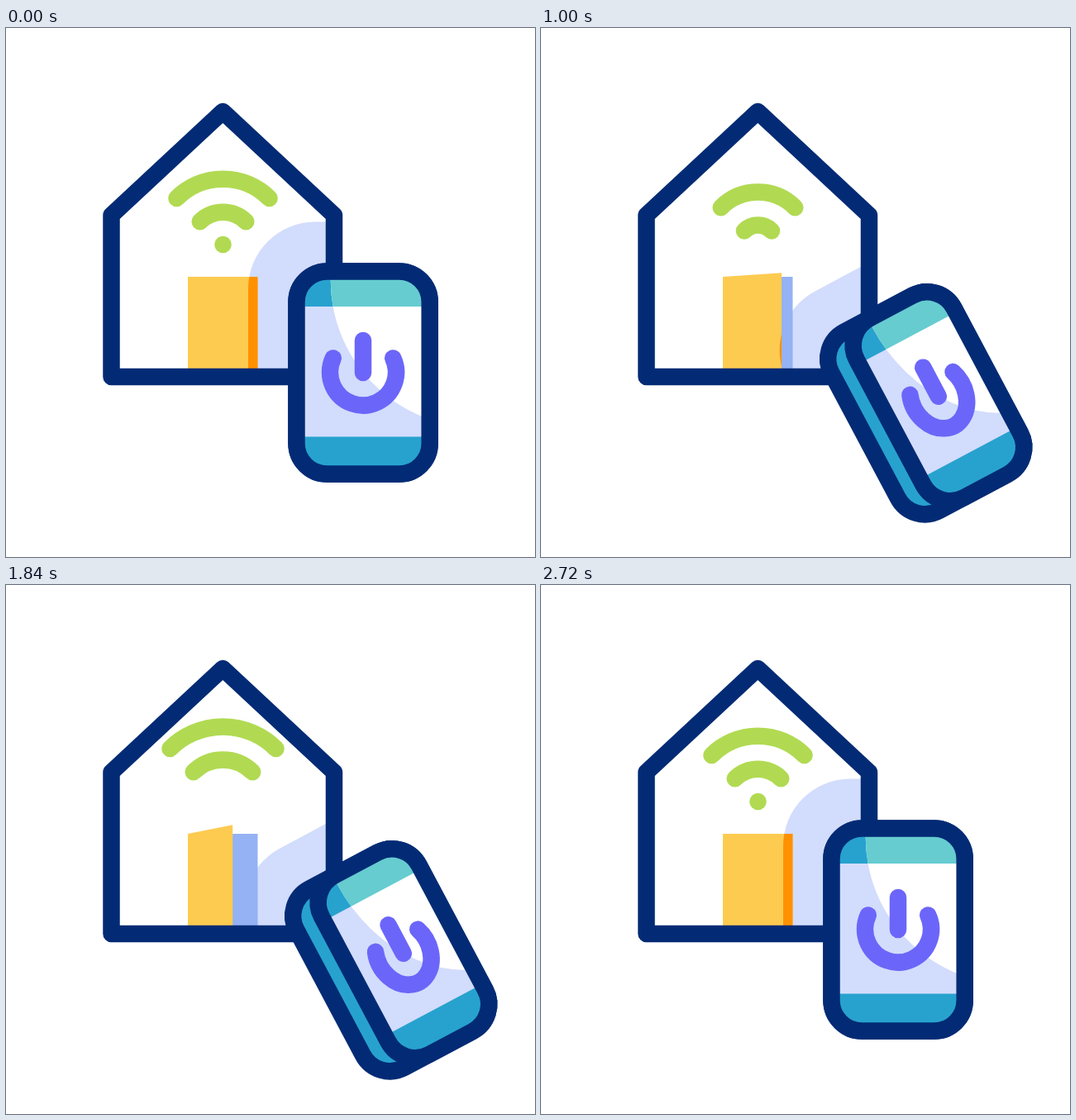
Recreate the animation shown at these times as an HTML page with a canvas. Size 640x640 px, loop 3000 ms.

```html
<!DOCTYPE html>
<html lang="en">
<head>
<meta charset="utf-8">
<title>Smart home</title>
<style>
  html, body { margin: 0; width: 100%; height: 100%; overflow: hidden; background: #fff; }
  canvas { display: block; width: 640px; height: 640px; }
</style>
</head>
<body>
<canvas id="stage" width="640" height="640"></canvas>
<script>
const ctx = document.getElementById('stage').getContext('2d');
const LOOP = 3000, LINE = 20.5;
const NAVY = '#032b75', GREEN = '#b1da52', YELLOW = '#fdcb50', ORANGE = '#ff9100',
      LILAC = '#d2dcfc', BLUE = '#94b2f4', TEAL = '#27a2ce', AQUA = '#66ccd0', PURPLE = '#6b66f9';
const PIVOT = { x: 521, y: 361.5 };
const RIGHT = 502.5; // right edge of the screen, fixed while the phone turns

// Keys are [time, value] pairs joined by a smooth ease.
function ease(t, keys) {
  let [t0, v0] = keys[0];
  for (const [t1, v1] of keys) {
    if (t < t1) {
      const p = Math.max(0, (t - t0) / (t1 - t0));
      return v0 + (v1 - v0) * p * p * (3 - 2 * p);
    }
    [t0, v0] = [t1, v1];
  }
  return v0;
}

const tilt = t => ease(t, [[400, 0], [900, 28], [1900, 28], [2400, 0]]);
const turn = t => ease(t, [[200, 0], [800, 1], [2000, 1], [2600, 0]]);
const doorSwing = t => ease(t, [[800, 0], [1380, 48.5], [1600, 48.5], [2060, 14.5], [2300, 14.5], [2600, 0]]);
const iconScale = t => ease(t, [[960, 1], [1280, 1.4], [1560, 0.935], [1800, 1]]);

function polygon(...points) {
  const path = new Path2D();
  points.forEach(([x, y]) => path.lineTo(x, y));
  path.closePath();
  return path;
}

function rounded(left, top, right, bottom, radius) {
  const path = new Path2D();
  path.roundRect(left, top, right - left, bottom - top, radius);
  return path;
}

function fill(path, color) {
  ctx.fillStyle = color;
  ctx.fill(path);
}

function stroke(path, color) {
  ctx.strokeStyle = color;
  ctx.stroke(path);
}

function clipped(path, draw) {
  ctx.save();
  ctx.clip(path);
  draw();
  ctx.restore();
}

const house = polygon([127.5, 226.5], [262.3, 101], [397, 226.5], [397, 422], [127.5, 422]);
const doorway = polygon([220, 301], [304.5, 301], [304.5, 420], [220, 420]);
const halo = rounded(293, 234.5, 700, 700, 81);

function rotated(t, draw) {
  ctx.save();
  ctx.translate(PIVOT.x, PIVOT.y);
  ctx.rotate(-tilt(t) * Math.PI / 180);
  ctx.translate(-PIVOT.x, -PIVOT.y);
  draw();
  ctx.restore();
}

function drawHouse(t) {
  const swing = doorSwing(t), edge = 304.5 - swing;
  const door = polygon([220, 301], [edge, 301 - 0.355 * swing], [edge, 420], [220, 420]);
  clipped(house, () => {
    rotated(t, () => fill(halo, LILAC));
    if (swing > 0) fill(doorway, BLUE);
    fill(door, YELLOW);
    clipped(door, () => rotated(t, () => fill(halo, ORANGE)));
  });
  stroke(house, NAVY);
}

function drawWifi(t) {
  const x = 262.5, y = 262;
  const phase = (Math.min(Math.max(t, 200), 2700) - 200) % 500;
  const shift = 0.08 * (phase < 190 ? phase : phase - 500);
  for (const radius of [39.3, 79.3]) {
    const arc = new Path2D();
    arc.arc(x, y, radius + shift, -Math.PI * 0.75, -Math.PI * 0.25);
    stroke(arc, GREEN);
  }
  if (t < 220 || t >= 2720) {
    const dot = new Path2D();
    dot.arc(x, y, 10.3, 0, 7);
    fill(dot, GREEN);
  }
}

function drawScreen(squeeze) {
  ctx.translate(RIGHT, 0);
  ctx.scale(squeeze, 1);
  ctx.translate(-RIGHT, 0);
  const header = rounded(340, 290, 520, 337, 0);
  const light = new Path2D();
  light.arc(571, 305, 178.3, 0, 7);
  fill(rounded(340, 290, 520, 545, 0), LILAC);
  fill(header, TEAL);
  clipped(light, () => {
    fill(rounded(340, 290, 520, 545, 0), '#fff');
    fill(header, AQUA);
  });
  fill(rounded(340, 494.5, 520, 545, 0), TEAL);
}

function drawPower(squeeze, scale) {
  const x = RIGHT - 70.5 * squeeze, y = 416.5, r = 40 * scale;
  const icon = new Path2D();
  icon.ellipse(x, y, r * squeeze, r, 0, -0.44, Math.PI + 0.44);
  icon.moveTo(x, y - 38.5 * scale);
  icon.lineTo(x, y + 0.5 * scale);
  stroke(icon, PURPLE);
}

function drawPhone(t) {
  const depth = turn(t), squeeze = 1 - 28 * depth / 141;
  const back = rounded(351.5 - 6.5 * depth, 294.5, 512.7, 539.5, 37);
  const front = rounded(351.5 + 28 * depth, 294.5, 512.7, 539.5, 37);
  rotated(t, () => {
    fill(back, TEAL);
    stroke(back, NAVY);
    clipped(front, () => drawScreen(squeeze));
    stroke(front, NAVY);
    drawPower(squeeze, iconScale(t));
  });
}

function render(now) {
  const t = now % LOOP;
  ctx.fillStyle = '#fff';
  ctx.fillRect(0, 0, 640, 640);
  ctx.lineWidth = LINE;
  ctx.lineCap = ctx.lineJoin = 'round';
  drawHouse(t);
  drawWifi(t);
  drawPhone(t);
  requestAnimationFrame(render);
}
render(performance.now());
</script>
</body>
</html>
```
